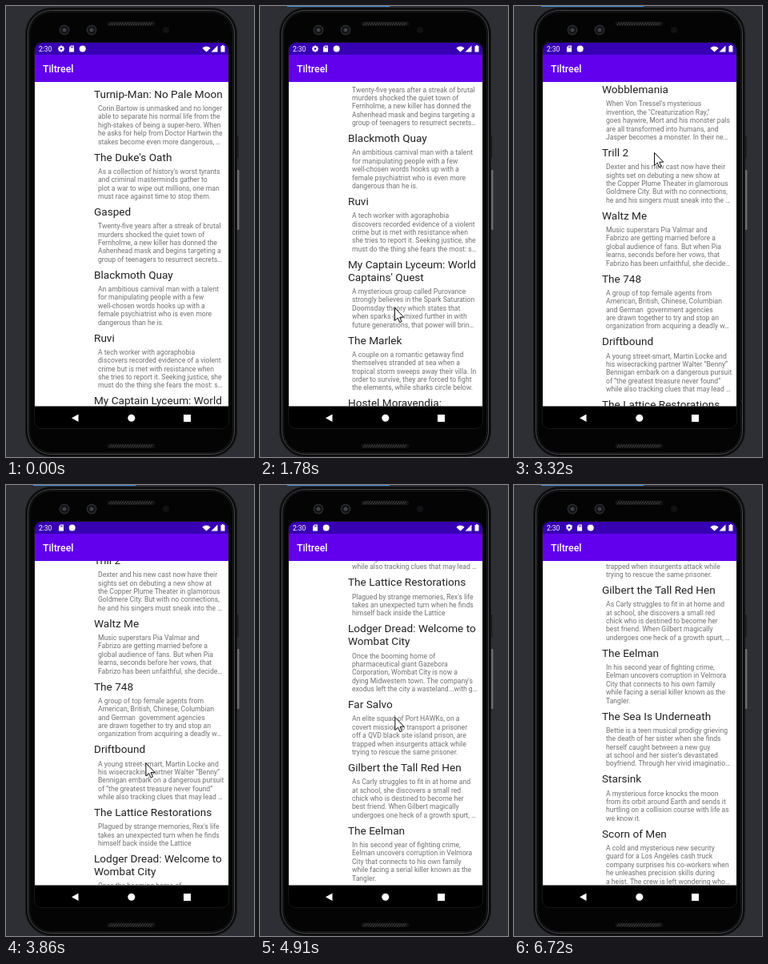
These frames come from a looping animation (310x564 px, 6970 ms). An HTML page with a canvas:

```html
<!DOCTYPE html>
<html lang="en">
<head>
<meta charset="utf-8">
<title>Movie list</title>
<style>
html, body { margin: 0; width: 100%; height: 100%; overflow: hidden; background: #2e2f34; }
canvas { display: block; width: 310px; height: 564px; }
</style>
</head>
<body>
<canvas id="stage"></canvas>
<script>
const W = 310, H = 564, LOOP = 6970;
const FONT = 'Roboto, "Open Sans", sans-serif';
const PURPLE = '#6200ee', DEEP = '#3700b3', WHITE = '#fff';
const canvas = document.getElementById('stage');
const dpr = window.devicePixelRatio || 1;
canvas.width = W * dpr;
canvas.height = H * dpr;
const c = canvas.getContext('2d');

// Title lines, then description lines
const movies = [
  ['Turnip-Man: No Pale Moon', 'Corin Bartow is unmasked and no longer|able to separate his normal life from the|high-stakes of being a super-hero. When|he asks for help from Doctor Hartwin the|stakes become even more dangerous, …'],
  ["The Duke's Oath", "As a collection of history's worst tyrants|and criminal masterminds gather to|plot a war to wipe out millions, one man|must race against time to stop them."],
  ['Gasped', 'Twenty-five years after a streak of brutal|murders shocked the quiet town of|Fernholme, a new killer has donned the|Ashenhead mask and begins targeting a|group of teenagers to resurrect secrets…'],
  ['Blackmoth Quay', 'An ambitious carnival man with a talent|for manipulating people with a few|well-chosen words hooks up with a|female psychiatrist who is even more|dangerous than he is.'],
  ['Ruvi', 'A tech worker with agoraphobia|discovers recorded evidence of a violent|crime but is met with resistance when|she tries to report it. Seeking justice, she|must do the thing she fears the most: s…'],
  ["My Captain Lyceum: World|Captains' Quest", 'A mysterious group called Purovance|strongly believes in the Spark Saturation|Doomsday theory which states that|when sparks get mixed further in with|future generations, that power will brin…'],
  ['The Marlek', 'A couple on a romantic getaway find|themselves stranded at sea when a|tropical storm sweeps away their villa. In|order to survive, they are forced to fight|the elements, while sharks circle below.'],
  ['Hostel Moravendia:|Wobblemania', "When Von Tressel's mysterious|invention, the \"Creaturization Ray,\"|goes haywire, Mort and his monster pals|are all transformed into humans, and|Jasper becomes a monster. In their ne…"],
  ['Trill 2', 'Dexter and his new cast now have their|sights set on debuting a new show at|the Copper Plume Theater in glamorous|Goldmere City. But with no connections,|he and his singers must sneak into the …'],
  ['Waltz Me', 'Music superstars Pia Valmar and|Fabrizo are getting married before a|global audience of fans. But when Pia|learns, seconds before her vows, that|Fabrizo has been unfaithful, she decide…'],
  ['The 748', 'A group of top female agents from|American, British, Chinese, Columbian|and German  government agencies|are drawn together to try and stop an|organization from acquiring a deadly w…'],
  ['Driftbound', 'A young street-smart, Martin Locke and|his wisecracking partner Walter “Benny”|Bennigan embark on a dangerous pursuit|of “the greatest treasure never found”|while also tracking clues that may lead …'],
  ['The Lattice Restorations', "Plagued by strange memories, Rex's life|takes an unexpected turn when he finds|himself back inside the Lattice"],
  ['Lodger Dread: Welcome to|Wombat City', "Once the booming home of|pharmaceutical giant Gazebora|Corporation, Wombat City is now a|dying Midwestern town. The company's|exodus left the city a wasteland...with g…"],
  ['Far Salvo', 'An elite squad of Port HAWKs, on a|covert mission to transport a prisoner|off a QVD black site island prison, are|trapped when insurgents attack while|trying to rescue the same prisoner.'],
  ['Gilbert the Tall Red Hen', 'As Carly struggles to fit in at home and|at school, she discovers a small red|chick who is destined to become her|best friend. When Gilbert magically|undergoes one heck of a growth spurt, …'],
  ['The Eelman', 'In his second year of fighting crime,|Eelman uncovers corruption in Velmora|City that connects to his own family|while facing a serial killer known as the|Tangler.'],
  ['The Sea Is Underneath', "Bettie is a teen musical prodigy grieving|the death of her sister when she finds|herself caught between a new guy|at school and her sister's devastated|boyfriend. Through her vivid imaginatio…"],
  ['Starsink', 'A mysterious force knocks the moon|from its orbit around Earth and sends it|hurtling on a collision course with life as|we know it.'],
  ['Scorn of Men', 'A cold and mysterious new security|guard for a Los Angeles cash truck|company surprises his co-workers when|he unleashes precision skills during|a heist. The crew is left wondering who…']
].map(m => m.map(s => s.split('|')));

// Each swipe drags the pointer from y0 to y1 and the list from s0 to s1;
// between swipes the list glides on while the pointer returns.
const END = 1177.6;
const swipe = (start, end, x, y0, y1, s0, s1) => ({ start, end, x, y0, y1, s0, s1 });
const swipes = [
  swipe(950, 1350, 168, 426, 250, 0, 140),
  swipe(1780, 1930, 165, 377, 196, 170.7, 345),
  swipe(2500, 3320, 175, 402, 183, 420, 578.8),
  swipe(3590, 4250, 171, 380, 176, 640, 814),
  swipe(4640, 5030, 165, 370, 190, 880, 1050),
  swipe(5180, 5420, 156, 390, 315, 1110, 1173.6),
  swipe(5570, 6190, 160, 300, 220, END, END),
  swipe(6340, 6600, 215, 508, 548, END, END)
];

const mix = (a, b, p) => a + (b - a) * p;
const smooth = p => p * p * (3 - 2 * p);

// Progress from a to b, refreshed about every 135 ms
function stepped(a, b, t) {
  const n = Math.max(1, Math.round((b - a) / 135));
  return Math.floor((t - a) / (b - a) * n + 1e-6) / n;
}

function pose(t) {
  if (t < 830) return { x: 211, y: 438, scroll: 0 };
  let last = { end: 830, x: 166, y1: 426, s1: 0 };
  for (const s of swipes) {
    if (t < s.start) {
      const p = smooth(stepped(last.end, s.start, t));
      return { x: last.x, y: mix(last.y1, s.y0, p), scroll: mix(last.s1, s.s0, p) };
    }
    if (t < s.end) {
      const p = stepped(s.start, s.end, t) ** 2;
      return { x: mix(last.x, s.x, p), y: mix(s.y0, s.y1, p), scroll: mix(s.s0, s.s1, p) };
    }
    last = s;
  }
  return { x: last.x, y: last.y1, scroll: last.s1 };
}

function rect(x, y, w, h, color) {
  c.fillStyle = color;
  c.fillRect(x, y, w, h);
}

function round(x, y, w, h, r, fill, stroke) {
  c.beginPath();
  c.roundRect(x, y, w, h, r);
  if (fill) { c.fillStyle = fill; c.fill(); }
  if (stroke) { c.strokeStyle = stroke; c.lineWidth = 1; c.stroke(); }
}

function disc(x, y, r, color) {
  c.beginPath();
  c.arc(x, y, r, 0, Math.PI * 2);
  c.fillStyle = color;
  c.fill();
}

function poly(color, ...pts) {
  c.beginPath();
  for (const [x, y] of pts) c.lineTo(x, y);
  c.closePath();
  c.fillStyle = color;
  c.fill();
}

function text(s, x, y, size, color, weight = 400) {
  c.font = `${weight} ${size}px ${FONT}`;
  c.fillStyle = color;
  c.fillText(s, x, y);
}

function speaker(y) {
  round(126.5, y, 60, 5.5, 2.7, '#121212');
  c.beginPath();
  for (let x = 129; x < 183; x += 3) {
    c.moveTo(x, y + 4.7);
    c.lineTo(x + 3, y + 0.8);
  }
  c.strokeStyle = '#4a4a4a';
  c.lineWidth = 1;
  c.stroke();
}

function lens(x) {
  disc(x, 30, 6.5, '#2b2b2d');
  disc(x, 30, 4.8, '#101114');
  disc(x, 30, 2.5, '#3e4148');
}

function phone() {
  rect(0, 0, W, H, '#2e2f34');
  round(287.5, 162, 3, 28, 1, '#1a1a1b');
  round(288.5, 205, 3, 75, 1, '#6a6b6e');
  round(24.5, 2.5, 264, 561, 32, '#0c0c0d', '#161617');
  round(27.5, 5.5, 258, 555, 29, '#060606', '#4b4c4f');
  round(29.5, 7.5, 254, 551, 27, '#040404', '#1b1b1c');
  round(35.5, 45.5, 243, 483, 9, '#000', '#161616');
  speaker(19.5);
  speaker(547.5);
  lens(73);
  lens(107);
  disc(200, 30, 4, '#111114');
}

function gear(x, y) {
  for (let i = 0; i < 4; i++) {
    c.save();
    c.translate(x, y);
    c.rotate(i * Math.PI / 4);
    rect(-1, -4, 2, 8, WHITE);
    c.restore();
  }
  disc(x, y, 3, WHITE);
  disc(x, y, 1.3, DEEP);
}

function shield(x, y) {
  poly(WHITE, [x, y - 4.5], [x + 3.7, y - 3], [x + 3.5, y + 1], [x, y + 4.5], [x - 3.5, y + 1], [x - 3.7, y - 3]);
  disc(x, y - 0.3, 1.3, DEEP);
}

function card(x, y) {
  poly(WHITE, [x - 1, y - 4], [x + 3, y - 4], [x + 3, y + 4], [x - 3, y + 4], [x - 3, y - 2]);
  for (let i = 0; i < 3; i++) rect(x - 1.1 + i * 1.3, y - 3, 0.7, 2, DEEP);
}

function statusBar(t) {
  round(36, 46, 242, 15, [9, 9, 0, 0], DEEP);
  text('2:30', 41, 56.6, 8.5, WHITE);
  const early = t < 2080, late = t >= 6340;
  const x = early || late ? 82 : 69;
  if (early) gear(69, 53.5);
  if (late) shield(69, 53.5);
  card(x, 53.5);
  disc(x + 13.7, 53.5, 4, WHITE);
  c.beginPath();
  c.moveTo(250.5, 57.5);
  c.arc(250.5, 57.5, 7, -Math.PI * 0.76, -Math.PI * 0.24);
  c.fillStyle = WHITE;
  c.fill();
  poly(WHITE, [264.5, 49.5], [264.5, 57.5], [256.5, 57.5]);
  rect(268.5, 50, 5, 7.5, WHITE);
  rect(270, 49, 2, 1, WHITE);
}

function list(scroll, glow) {
  c.save();
  c.beginPath();
  c.rect(36, 95, 242, 405.4);
  c.clip();
  rect(36, 95, 242, 406, WHITE);
  let y = 114.8 - scroll;
  for (const [title, lines] of movies) {
    const extra = (title.length - 1) * 16;
    const height = 26.8 + extra + lines.length * 10.4;
    if (y + height > 70 && y < 520) {
      title.forEach((s, i) => text(s, 110, y + i * 16, 13.6, '#212121'));
      lines.forEach((s, i) => text(s, 115, y + extra + 16.2 + i * 10.4, 8.65, '#707070'));
    }
    y += height;
  }
  if (glow > 0) {
    c.beginPath();
    c.moveTo(36, 501);
    c.quadraticCurveTo(157, 501 - 40 * glow, 278, 501);
    c.fillStyle = `rgba(98, 0, 238, ${0.15 * glow})`;
    c.fill();
  }
  c.restore();
}

function navBar() {
  poly(WHITE, [82, 515.3], [90.5, 510.6], [90.5, 520]);
  disc(156.8, 515.3, 4.5, WHITE);
  rect(222, 511, 9, 9, WHITE);
}

function cursor(x, y) {
  c.save();
  c.translate(x + 0.5, y + 0.5);
  c.lineJoin = 'round';
  poly(WHITE, [0, 0], [0, 16], [3.7, 12.6], [6.2, 18.2], [8.6, 17.1], [6.2, 11.7], [11.3, 11.7]);
  c.strokeStyle = '#111';
  c.lineWidth = 1;
  c.stroke();
  c.restore();
}

function draw(t) {
  const { x, y, scroll } = pose(t);
  const pull = t > 5420 && t < 6340 ? stepped(5420, 6340, t) : 0;
  c.setTransform(dpr, 0, 0, dpr, 0, 0);
  phone();
  if (t >= 430) rect(34, 0, 128, 1, '#3d8fe8');
  statusBar(t);
  rect(36, 61, 242, 34, PURPLE);
  text('Tiltreel', 46, 82.6, 12.3, WHITE, 500);
  list(scroll, Math.sin(Math.PI * pull));
  navBar();
  if (t >= 680 && t < 6720) cursor(x, y);
}

const start = performance.now();
function loop() {
  draw((performance.now() - start) % LOOP);
  requestAnimationFrame(loop);
}
loop();
</script>
</body>
</html>
```
